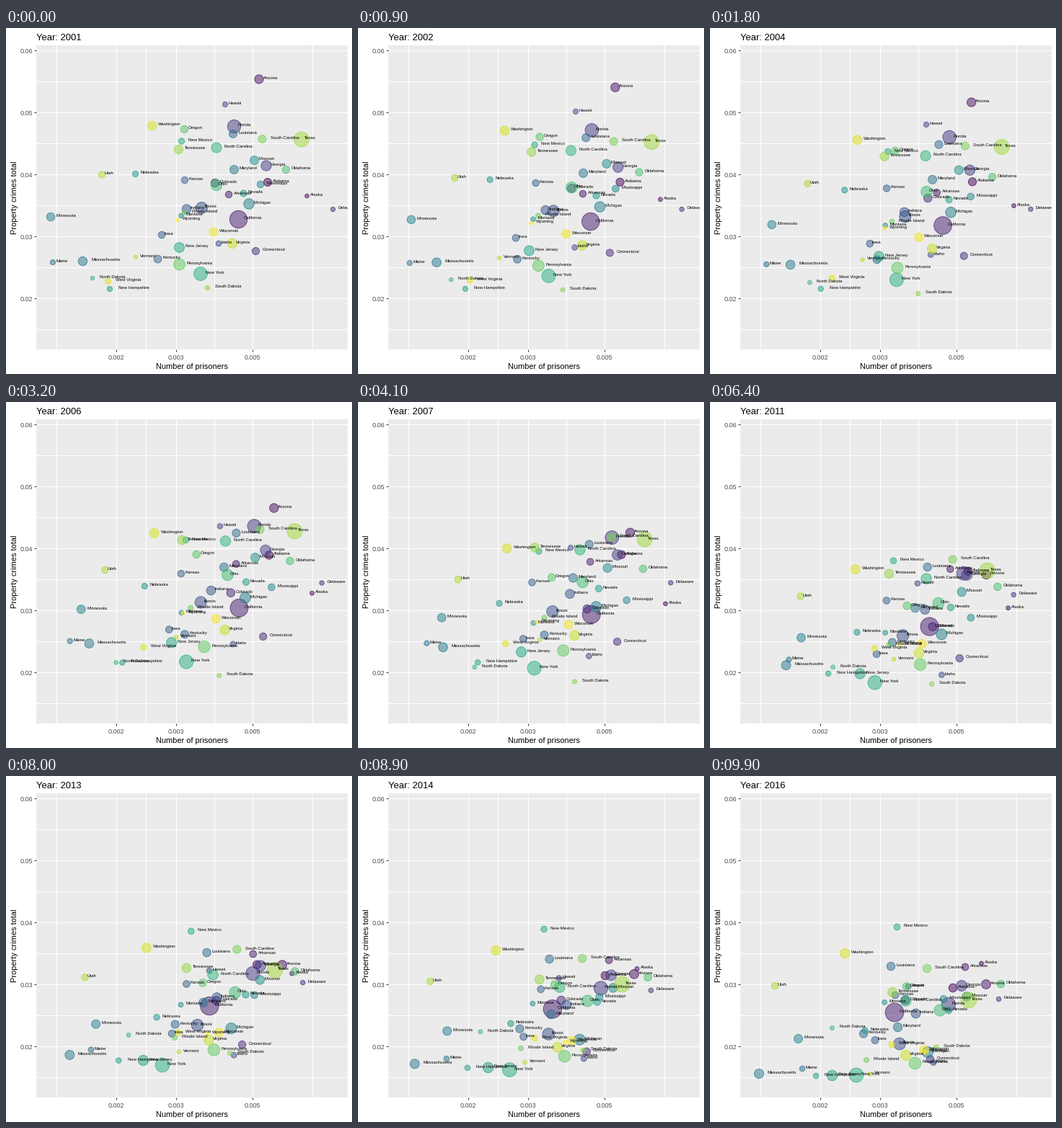
Animation of 480 by 480 pixels, one loop 10 s. Source, as a matplotlib script:

```python
import numpy as np
import matplotlib.pyplot as plt
from matplotlib.animation import FuncAnimation

SIZE, DPI, FRAMES, MIDDLE = 480, 72, 100, 50
LEFT, RIGHT, TOP, BOTTOM = 42, 474, 24, 446
X_TICKS = {"0.002": 152.5, "0.003": 235.5, "0.005": 341.5}

plt.rcParams["font.family"] = "Liberation Sans"

fig = plt.figure(figsize=(SIZE / DPI, SIZE / DPI), dpi=DPI, facecolor="white")
ax = fig.add_axes([LEFT / SIZE, 1 - BOTTOM / SIZE,
                   (RIGHT - LEFT) / SIZE, (BOTTOM - TOP) / SIZE])
ax.set(xlim=(LEFT, RIGHT), ylim=(BOTTOM, TOP), facecolor="#EBEBEB")
ax.spines[:].set_visible(False)

states = []


def state(name, millions, first, middle, last):
    """A bubble that passes through three points, given in pixels."""
    label = ax.text(0, 0, name, size=6, clip_on=True, zorder=3)
    shift = 0.3 * label.get_window_extent().width - 0.6
    states.append((label, shift, millions, np.array([first, middle, last])))


state("Alabama", 4.7, (363, 214), (366, 211), (337, 294))
state("Alaska", .69, (417.5, 233), (428.5, 296), (376.5, 260))
state("Arizona", 6.2, (351, 71), (383.5, 219.5), (383, 289))
state("Arkansas", 2.85, (309, 231), (325, 218.5), (354, 265))
state("California", 36.9, (322.5, 265.5), (324, 305), (256, 328))
state("Colorado", 5, (290, 215), (324, 312), (271, 311))
state("Connecticut", 3.5, (346.5, 309.5), (362.5, 340.5), (305.5, 393))
state("Delaware", .88, (453.5, 251.5), (429.5, 250.5), (400.5, 309.5))
state("Florida", 18.5, (316.5, 136.5), (360, 206), (331, 317))
state("Georgia", 9.4, (361, 191), (359.5, 219.5), (349, 291))
state("Hawaii", 1.3, (304, 106), (293, 235.5), (275, 292))
state("Idaho", 1.5, (295, 299), (326, 371), (310, 397.5))
state("Illinois", 12.7, (271.5, 249.5), (269.5, 305), (263, 371.5))
state("Indiana", 6.4, (250.5, 251), (303.5, 271.5), (285.5, 329.5))
state("Iowa", 3, (216, 287), (232, 343), (229, 366.5))
state("Kansas", 2.8, (248, 211), (240, 264), (257, 304))
state("Kentucky", 4.3, (210.5, 320.5), (269, 324), (213, 357.5))
state("Louisiana", 4.6, (315, 147), (322, 215), (251, 264))
state("Maine", 1.3, (65, 325), (102, 338), (128, 406))
state("Maryland", 5.7, (316.5, 196.5), (294.5, 260.5), (260.5, 348.5))
state("Massachusetts", 6.6, (106.5, 323.5), (120.5, 346), (68, 413))
state("Michigan", 9.9, (337, 244), (329, 298), (302, 383))
state("Minnesota", 5.2, (62, 262), (128, 312), (122.5, 364.5))
state("Mississippi", 2.9, (353, 217), (377, 295), (324, 309.5))
state("Missouri", 5.9, (344.5, 183.5), (346.5, 246.5), (356, 306))
state("Montana", .97, (243, 260.5), (243.5, 322.5), (242, 314))
state("Nebraska", 1.8, (179.5, 202.5), (199.5, 306), (215, 353))
state("Nevada", 2.6, (329.5, 229.5), (335, 269), (331, 325))
state("New Hampshire", 1.3, (144, 362), (171, 361), (147, 416))
state("New Jersey", 8.7, (240.5, 304.5), (223.5, 361.5), (169.5, 415.5))
state("New Mexico", 2, (243.5, 157), (252.5, 224.5), (259.5, 209.5))
state("New York", 19.4, (270, 341), (239, 379), (203, 415))
state("North Carolina", 9.2, (292, 166), (311.5, 218.5), (271.5, 312))
state("North Dakota", .67, (120, 347), (171, 375), (169.5, 349.5))
state("Ohio", 11.5, (292, 218), (316, 261), (319, 325))
state("Oklahoma", 3.7, (388.5, 196.5), (397, 243.5), (403.5, 288.5))
state("Oregon", 3.8, (247.5, 140.5), (273.5, 279), (272.5, 292))
state("Pennsylvania", 12.6, (240.5, 328), (294.5, 350.5), (284.5, 398.5))
state("Rhode Island", 1.06, (247.5, 256), (261, 314), (217, 394))
state("South Carolina", 4.5, (355.5, 154), (351, 199), (301, 267))
state("South Dakota", .81, (279.5, 360.5), (305, 397.5), (314, 376))
state("Tennessee", 6.2, (239.5, 168.5), (246.5, 213.5), (253, 300))
state("Texas", 24.6, (410, 154.5), (395, 203), (359, 311))
state("Utah", 2.7, (133, 203.5), (140, 261), (90, 291))
state("Vermont", .62, (180, 318), (268, 334), (222, 413.5))
state("Virginia", 7.8, (314, 299), (297.5, 332.5), (271.5, 387.5))
state("Washington", 6.6, (202.5, 135.5), (207.5, 226.5), (187, 246))
state("West Virginia", 1.82, (141.5, 351.5), (218.5, 329.5), (252, 372.5))
state("Wisconsin", 5.6, (288, 283), (293, 317.5), (297, 380))
state("Wyoming", .54, (238, 266.5), (250, 318), (297, 382))

labels, shifts, people, paths = zip(*states)
people, paths = np.array(people), np.array(paths)


def centers(i):
    if i <= MIDDLE:
        # Crime falls slowly at first, then faster
        u, leg = i / MIDDLE, 0
        ease = np.array([u, u ** 1.5])
    else:
        ease, leg = (i - MIDDLE) / (FRAMES - 1 - MIDDLE), 1
    return paths[:, leg] + (paths[:, leg + 1] - paths[:, leg]) * ease


def diameters(i):
    growth = 0.94 + 0.12 * i / (FRAMES - 1)
    share = np.clip((people * growth - 0.5) / 38.7, 0, 1)
    return 0.75 * 2.845 * (2 + 10 * np.sqrt(share))


def middles(values, count):
    """Minor grid positions: halfway between the majors and one beyond."""
    v = np.array(values)
    inner = (v[1:] + v[:-1]) / 2
    return [*inner, *count * [v[0] - (v[1] - v[0])], *count * [v[-1] + (v[1] - v[0])]]


x_major = list(X_TICKS.values())
y_major = 31.5 + 86 * np.arange(5)
for gx in x_major + middles(x_major, 1):
    ax.axvline(gx, color="white", lw=1, zorder=0)
for gy in [*y_major, *(y_major + 43)]:
    ax.axhline(gy, color="white", lw=1, zorder=0)

ax.set_xticks(x_major, X_TICKS.keys())
ax.set_yticks(y_major, [f"{0.06 - 0.01 * k:.2f}" for k in range(5)])
ax.tick_params(length=2.75, width=1, color="#333333", labelcolor="#4D4D4D", labelsize=9)
ax.tick_params(axis="x", pad=4.3)
ax.tick_params(axis="y", pad=2.2)
ax.text(258, 473, "Number of prisoners", size=11, ha="center")
ax.text(15, 235, "Property crimes total", size=11, ha="center",
        rotation=90, rotation_mode="anchor")
title = ax.text(LEFT, 17, "", size=13)

# Translucent fill with a denser rim of the same colour
fill = plt.cm.viridis(np.linspace(0, 1, len(states)))
rim = fill.copy()
fill[:, 3], rim[:, 3] = 0.5, 0.7
dots = ax.scatter(*centers(0).T, s=diameters(0) ** 2, facecolors=fill,
                  edgecolors=rim, linewidths=1, zorder=2)


def draw(i):
    points = centers(i)
    dots.set_offsets(points)
    dots.set_sizes(diameters(i) ** 2)
    for label, shift, (x, y) in zip(labels, shifts, points):
        label.set_position((x + shift, y))
    title.set_text(f"Year: {round(2001 + 15 * i / (FRAMES - 1))}")
    return [dots, title, *labels]


anim = FuncAnimation(fig, draw, frames=FRAMES, interval=100,
                     init_func=lambda: draw(0), repeat=True, repeat_delay=0)
plt.show()
```
